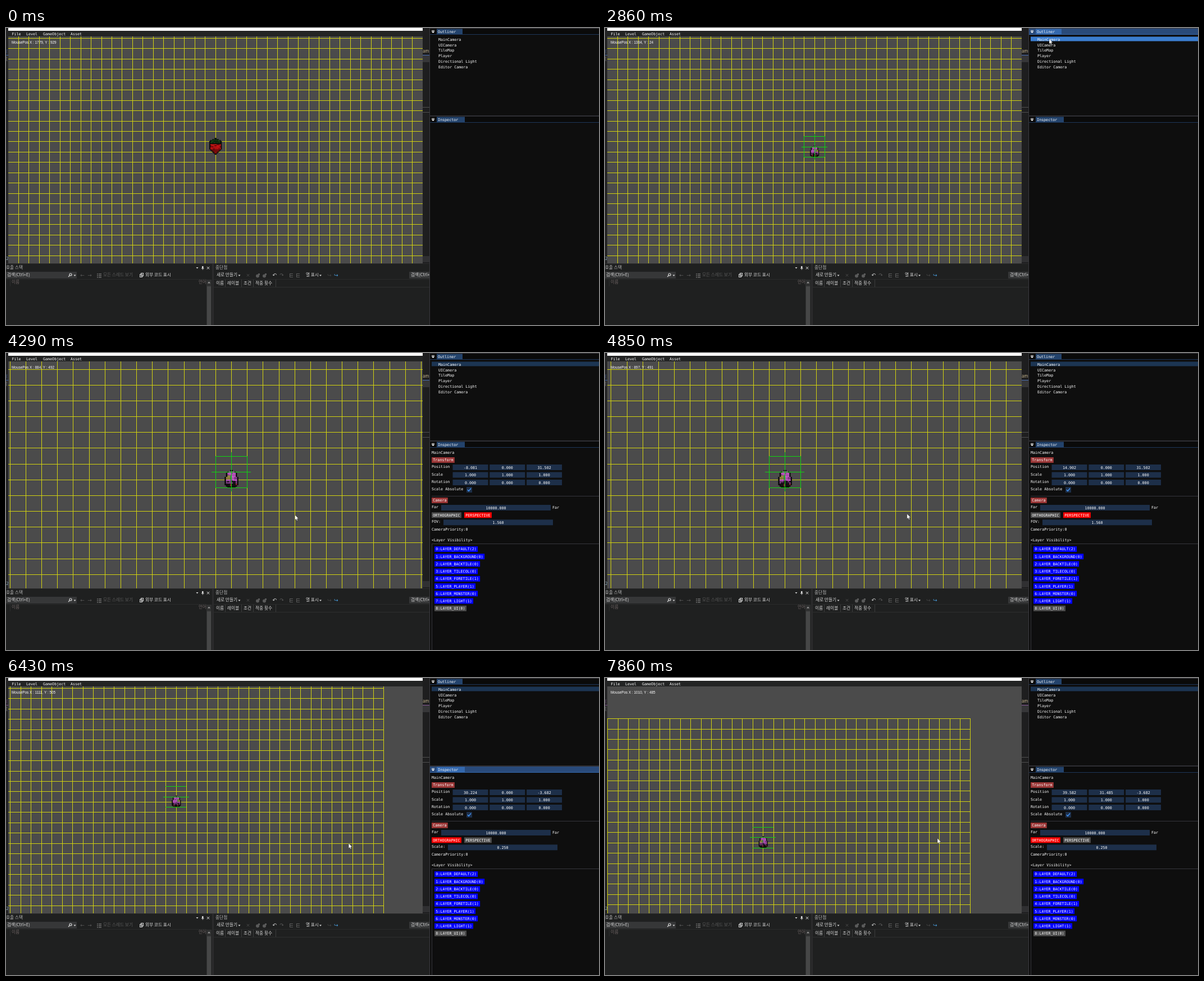
These frames come from a looping animation (1056 px wide and 530 px high, 8 s). An HTML page with a canvas:

```html
<!DOCTYPE html>
<html lang="en">
<head>
<meta charset="utf-8">
<title>Scene editor camera</title>
<style>
  html, body { margin: 0; width: 100%; height: 100%; overflow: hidden; background: #1f1f1f; }
  canvas { display: block; }
</style>
</head>
<body>
<canvas id="stage" width="1056" height="530"></canvas>
<script>
const ctx = document.getElementById('stage').getContext('2d');
const MONO = '6.7px "DejaVu Sans Mono", monospace';
const SANS = '6.4px "Liberation Sans", sans-serif';
const KOREAN = '7.7px "Noto Sans CJK KR", "Noto Sans CJK", sans-serif';
const SYMBOL = '9px "DejaVu Sans", sans-serif';

const LOOP = 8000, STEPS = 56, STEP_MS = LOOP / STEPS;
const VIEW = { x: 4, y: 15, w: 738, h: 405, cx: 373.1, cy: 212.2 };
const CELL = 18.46, UNITS_PER_CELL = 8, EYE = 91.45;
const COLS = 40, ROWS = 23;
const INSPECT_AT = 22, ORTHO_AT = 42;

// Key poses: [step, value...], joined by straight lines.
const CURSOR = [
  [0, 1029.9, 540.5], [1, 1029.9, 540.5], [2, 738, 419], [6, 46, 10], [8, 46, 10],
  [15, 780, 19.5], [18, 791, 19.5], [22, 791, 19.5], [25, 600, 250], [27, 514.6, 289],
  [33.4, 514.6, 289], [38, 693, 274], [41, 785, 289], [42.5, 785, 289], [44, 697.6, 298.5],
  [45, 610.2, 295], [48, 396, 277.4], [50, 396, 277.4], [54, 580, 283.3], [55, 592, 286]
];
const CAM_X = [[25, 0], [26, -8.081], [32.5, -8.081], [35, 30.224], [45.6, 30.224], [50, -41.082], [55, 39.582]];
const CAM_Y = [[47, 0], [50, -47.769], [55, 31.485]];
const CAM_Z = [[27, 0], [29.5, 31.502], [34.5, 31.502], [38, -21.778], [38.6, -21.778], [40, -3.682]];

function at(keys, step) {
  if (step <= keys[0][0]) return keys[0].slice(1);
  const next = keys.findIndex(key => key[0] > step);
  if (next < 0) return keys[keys.length - 1].slice(1);
  const a = keys[next - 1], b = keys[next];
  const k = (step - a[0]) / (b[0] - a[0]);
  return a.slice(1).map((v, i) => v + (b[i + 1] - v) * k);
}

function rect(x, y, w, h, color) {
  ctx.fillStyle = color;
  ctx.fillRect(x, y, w, h);
}

// Text placed by its vertical middle.
function text(str, x, y, color = '#fff', font = MONO, align = 'left') {
  ctx.font = font;
  ctx.fillStyle = color;
  ctx.textAlign = align;
  ctx.fillText(str, x, y + 2.4);
}

function poly(points, color) {
  ctx.fillStyle = color;
  ctx.beginPath();
  points.forEach(([x, y]) => ctx.lineTo(x, y));
  ctx.fill();
}

function button(label, x, y, color) {
  rect(x, y, label.length * 4.03 + 4.6, 10, color);
  text(label, x + 2.3, y + 5);
}

function field(value, x, y, w) {
  rect(x, y, w, 10, '#1d2f49');
  text(value, x + w / 2, y + 5.3, '#fff', MONO, 'center');
}

const hash = (a, b) => {
  const v = Math.sin(a * 12.99 + b * 78.23) * 43758.5;
  return v - Math.floor(v);
};

// Pixel-art body: one half width per row, outlined in black.
function pixelBody(cx, top, p, halves, colorAt) {
  halves.forEach((half, row) => {
    const y = top + row * p;
    rect(cx - half * p, y, half * 2 * p, p + 0.3, '#080808');
    for (let col = 1 - half; col < half - 1; col++) {
      if (row > 0 && row < halves.length - 1) rect(cx + col * p, y, p + 0.3, p + 0.3, colorAt(col, row));
    }
  });
}

function drawStrawberry(cx, cy) {
  pixelBody(cx, cy - 16, 1.85, [1, 3, 5, 6, 6, 6, 6, 6, 6, 6, 6, 5, 4, 3, 2, 1], (col, row) => {
    const n = hash(col, row);
    if (row < 5) return n > 0.5 ? '#1c4a1a' : '#0e260e';
    if (row < 6) return '#0c120a';
    return n > 0.75 ? '#6b0a0a' : row > 10 ? '#8a0d0d' : '#c81414';
  });
}

function drawPlayer(cx, cy, cell, step) {
  const side = step % 4 < 2 ? 1 : -1;
  pixelBody(cx, cy - cell * 0.12, cell / 11.5, [1, 3, 4, 4, 4, 5, 5, 5, 5, 5, 5, 4, 3], (col, row) => {
    const c = col * side;
    if (row > 9) return c === 1 || c === -3 ? '#8a2a2a' : '#151015';
    if (row > 3 && row < 7 && c > 0) return c === 1 ? '#3f8f50' : '#9a8a40';
    if (row > 7) return hash(col, row + step) > 0.5 ? '#1c121e' : '#7a3c80';
    return hash(col, row) > 0.8 ? '#8d4094' : '#c45ac8';
  });
}

function drawView(step, cam, ortho) {
  rect(VIEW.x, VIEW.y, VIEW.w, VIEW.h, '#4b4b4b');
  ctx.save();
  ctx.beginPath();
  ctx.rect(VIEW.x, VIEW.y, VIEW.w, VIEW.h);
  ctx.clip();

  const cell = ortho ? CELL : CELL * EYE / (EYE - cam.z);
  const unit = cell / UNITS_PER_CELL;
  const cx = VIEW.cx - cam.x * unit, cy = VIEW.cy + cam.y * unit;
  const left = cx - COLS / 2 * cell, top = cy - ROWS / 2 * cell;
  const vline = (x, y, h, color) => rect(Math.floor(x), Math.floor(y), 1, Math.ceil(h), color);
  const hline = (x, y, w, color) => rect(Math.floor(x), Math.floor(y), Math.ceil(w), 1, color);

  for (let c = 0; c <= COLS; c++) vline(left + c * cell, top, ROWS * cell, '#d2d210');
  for (let r = 0; r <= ROWS; r++) hline(left, top + r * cell, COLS * cell, '#d2d210');

  if (step < 7) {
    drawStrawberry(cx, cy);
  } else {
    drawPlayer(cx, cy, cell, step);
    const green = '#0fd60f', reach = cell * 1.24;
    hline(cx - cell, cy - cell, cell * 2, green);
    hline(cx - cell, cy + cell, cell * 2, green);
    hline(cx - reach, cy, reach * 2, green);
    // The upright lines lie on grid lines and lose to them on one side.
    if (!ortho || cam.x <= 0) {
      vline(cx - cell, cy - cell, cell * 2, green);
      vline(cx + cell, cy - cell, cell * 2, green);
      vline(cx, cy - reach, reach * 2, green);
    }
  }
  const [mx, my] = at(CURSOR, step - 0.4).map(v => Math.round((v - 5.7) * 1.737));
  text(`MousePos X : ${mx}, Y : ${my}`, 10, 25.5, '#fff', SANS);
  ctx.restore();
}

function drawBackdrop(step) {
  const accent = step < 40 ? '#4a6fb5' : '#8a5a9c';
  rect(0, 0, 1056, 530, '#1f2020');
  rect(0, 0, 4, 420, '#242425');
  rect(742, 0, 12, 420, '#1e1e1f');
  rect(0, 48, 4, 1, accent);
  rect(742, 48, 12, 1, accent);
  rect(742, 49, 12, 12, '#363638');
  rect(742, 141, 12, 1, '#505050');
  rect(742, 150, 12, 1, '#505050');
  rect(742, 407, 12, 11, '#303032');
  text('(', 0, 42, accent, KOREAN);
  text('[', 0, 55, '#aaa', KOREAN);
  text('am', 742, 42, '#c8b890', KOREAN);
  text('12', -4, 412, '#8ab', KOREAN);
  rect(4, 0, 738, 5, '#fff');
  rect(4, 5, 738, 10, '#232424');
  [['File', 10.5], ['Level', 36], ['GameObject', 66], ['Asset', 115]].forEach(([s, x]) => text(s, x, 10.5));
}

function drawDocks() {
  const dim = '#5a5a5a', light = '#d8d8d8';
  const label = (s, x, y, color = light) => text(s, x, y, color, KOREAN);
  const icon = (s, x, y, color = light) => text(s, x, y + 0.5, color, SYMBOL, 'center');
  const caret = (x, y) => poly([[x - 2, y - 1], [x + 2, y - 1], [x, y + 1.4]], light);

  rect(0, 420, 754, 110, '#1f2020');
  rect(0, 420, 754, 1, '#2c2c2d');
  rect(367, 421, 3, 109, '#2b2b2c');
  rect(0, 448, 357, 1, '#2b2c2c');
  rect(370, 448, 384, 1, '#2b2c2c');
  rect(370, 462, 384, 1, '#2e2f2f');

  label('호출 스택', 0, 428, '#b8b8b8');
  caret(340.5, 428);
  rect(349, 425, 2.5, 4, light);
  rect(348, 428.5, 4.5, 1, light);
  rect(349.8, 429.5, 1, 2, light);
  icon('×', 360, 428);
  rect(0, 435, 126, 12, '#363738');
  label('검색(Ctrl+E)', 2, 441);
  ctx.strokeStyle = light;
  ctx.lineWidth = 1.2;
  ctx.beginPath();
  ctx.arc(115, 440, 2, 0, 7);
  ctx.moveTo(113.5, 441.5);
  ctx.lineTo(111, 444);
  ctx.stroke();
  caret(122.5, 441.5);
  icon('←', 136, 441, dim);
  icon('→', 149, 441, dim);
  [438, 441, 444].forEach(y => { rect(162, y, 2, 2, dim); rect(165, y, 5, 2, dim); });
  label('모든 스레드 보기', 173, 441, dim);
  ctx.lineWidth = 1;
  ctx.strokeStyle = light;
  ctx.strokeRect(238.5, 439.5, 4, 5);
  ctx.strokeRect(240.5, 437.5, 4, 5);
  label('외부 코드 표시', 248, 441);
  rect(7, 449, 1, 12, '#2c2d2d');
  label('이름', 10, 454, '#6c6262');
  label('언어', 343, 454, '#6c6262');
  rect(357, 449, 9, 81, '#303131');
  rect(358, 461, 7, 69, '#464747');
  poly([[359, 455.5], [364, 455.5], [361.5, 452.5]], '#999');

  label('중단점', 373, 428, '#b8b8b8');
  label('새로 만들기', 375, 441);
  caret(415.5, 441.5);
  icon('×', 431, 441, '#484848');
  [448, 460].forEach(x => {
    ctx.fillStyle = dim;
    ctx.beginPath();
    ctx.arc(x, 442.5, 3, 0, 7);
    ctx.fill();
    rect(x + 1, 438, 3, 3, dim);
  });
  icon('↶', 478, 441);
  icon('↷', 491, 441, dim);
  [505, 517].forEach(x => { [438, 441, 444].forEach(y => rect(x, y, 6, 1, dim)); rect(x, 438, 1, 7, dim); });
  label('열 표시', 534, 441);
  caret(560, 441.5);
  icon('↪', 576, 441, '#444');
  icon('↪', 588, 441, '#4a9fe0');
  rect(718, 435, 36, 12, '#363738');
  label('검색(Ctrl+', 721, 441);
  [['이름', 374], ['레이블', 394], ['조건', 423], ['적중 횟수', 444]].forEach(([s, x]) => label(s, x, 455.5));
  [390, 419, 440, 480].forEach(x => rect(x, 449, 1, 13, '#3c3d3d'));
}

function panelHeader(title, y, tabWidth, focused) {
  rect(755, y, 301, 11, focused ? '#294a7a' : '#0a0a0a');
  rect(767, y + 0.5, tabWidth, 10, focused ? '#3468ad' : '#23436c');
  rect(755, y + 10, 301, 1, focused ? '#3468ad' : '#1d3659');
  rect(758, y + 3, 5, 1, '#fff');
  poly([[757.5, y + 5], [763.5, y + 5], [760.5, y + 8]], '#fff');
  text(title, 769, y + 5.5);
}

function drawOutliner(step) {
  rect(754, 0, 302, 530, '#0e0e0e');
  rect(754, 0, 302, 1, '#3a3a3f');
  rect(754, 0, 1, 530, '#3a3a3f');
  rect(754, 156, 302, 2, '#2f2f34');
  panelHeader('Outliner', 1, 46, step >= 14 && step < 25);
  if (step >= 15) rect(758, 15.5, 298, 8, step < 24 ? '#3b7dcf' : '#1c3553');
  ['MainCamera', 'UICamera', 'TileMap', 'Player', 'Directional Light', 'Editor Camera']
    .forEach((name, i) => text(name, 770, 20.3 + i * 9.8));
}

function drawInspector(step, cam, ortho) {
  panelHeader('Inspector', 158, 50, step >= ORTHO_AT && step < 47);
  if (step < INSPECT_AT) return;
  const vectorRow = (name, values, y) => {
    text(name, 758, y + 4);
    values.forEach((v, i) => field(v.toFixed(3), 795.5 + i * 65.8, y, 63));
  };
  text('MainCamera', 758, 178);
  button('Transform', 758, 186, '#9a3636');
  vectorRow('Position', [cam.x, cam.y, cam.z], 199);
  vectorRow('Scale', [1, 1, 1], 212.5);
  vectorRow('Rotation', [0, 0, 0], 226);
  text('Scale Absolute', 758, 243);
  rect(820, 239, 10, 10, '#1d2f49');
  ctx.strokeStyle = '#4296fa';
  ctx.lineWidth = 1.4;
  ctx.beginPath();
  ctx.moveTo(822, 244);
  ctx.lineTo(824, 246.5);
  ctx.lineTo(828, 241.5);
  ctx.stroke();

  rect(758, 255, 298, 1, '#36363c');
  button('Camera', 758, 258, '#9a3636');
  text('Far', 758, 275);
  field('10000.000', 775, 271, 195);
  text('Far', 973, 276);
  button('ORTHOGRAPHIC', 758, 284.3, ortho ? '#f00' : '#4d4d4d');
  button('PERSPECTIVE', 816, 284.3, ortho ? '#4d4d4d' : '#f00');
  text(ortho ? 'Scale:' : 'FOV:', 758, 301);
  field(ortho ? '0.250' : '1.560', ortho ? 787 : 779, 297.3, 195);
  text('CameraPriority:0', 758, 314.5);

  text('<Layer Visibility>', 758, 334);
  rect(758, 340, 298, 1, '#36363c');
  rect(758, 340, 1, 190, '#36363c');
  ['DEFAULT(2)', 'BACKGROUND(0)', 'BACKTILE(0)', 'TILECOL(0)', 'FORETILE(1)',
   'PLAYER(1)', 'MONSTER(0)', 'LIGHT(1)', 'UI(0)']
    .forEach((name, i) => button(`${i}:LAYER_${name}`, 763, 345 + i * 13.22, i < 8 ? '#00f' : '#4d4d4d'));
}

function drawCursor(step) {
  const [x, y] = at(CURSOR, step);
  const arrow = [[0, 0], [0, 9], [2, 7.2], [3.4, 10.2], [4.8, 9.6], [3.5, 6.7], [6.2, 6.5]]
    .map(([dx, dy]) => [x + dx, y + dy]);
  poly(arrow, '#fff');
  ctx.strokeStyle = 'rgba(0,0,0,0.6)';
  ctx.lineWidth = 0.5;
  ctx.closePath();
  ctx.stroke();
}

function draw(step) {
  const cam = { x: at(CAM_X, step)[0], y: at(CAM_Y, step)[0], z: at(CAM_Z, step)[0] };
  const ortho = step >= ORTHO_AT;
  drawBackdrop(step);
  drawView(step, cam, ortho);
  drawDocks();
  drawOutliner(step);
  drawInspector(step, cam, ortho);
  drawCursor(step);
}

const start = performance.now();
let shown = -1;
function tick() {
  const time = (performance.now() - start) % LOOP;
  const step = Math.min(STEPS - 1, Math.floor((time + 23) / STEP_MS));
  if (step !== shown) draw(shown = step);
  requestAnimationFrame(tick);
}
tick();
</script>
</body>
</html>
```
